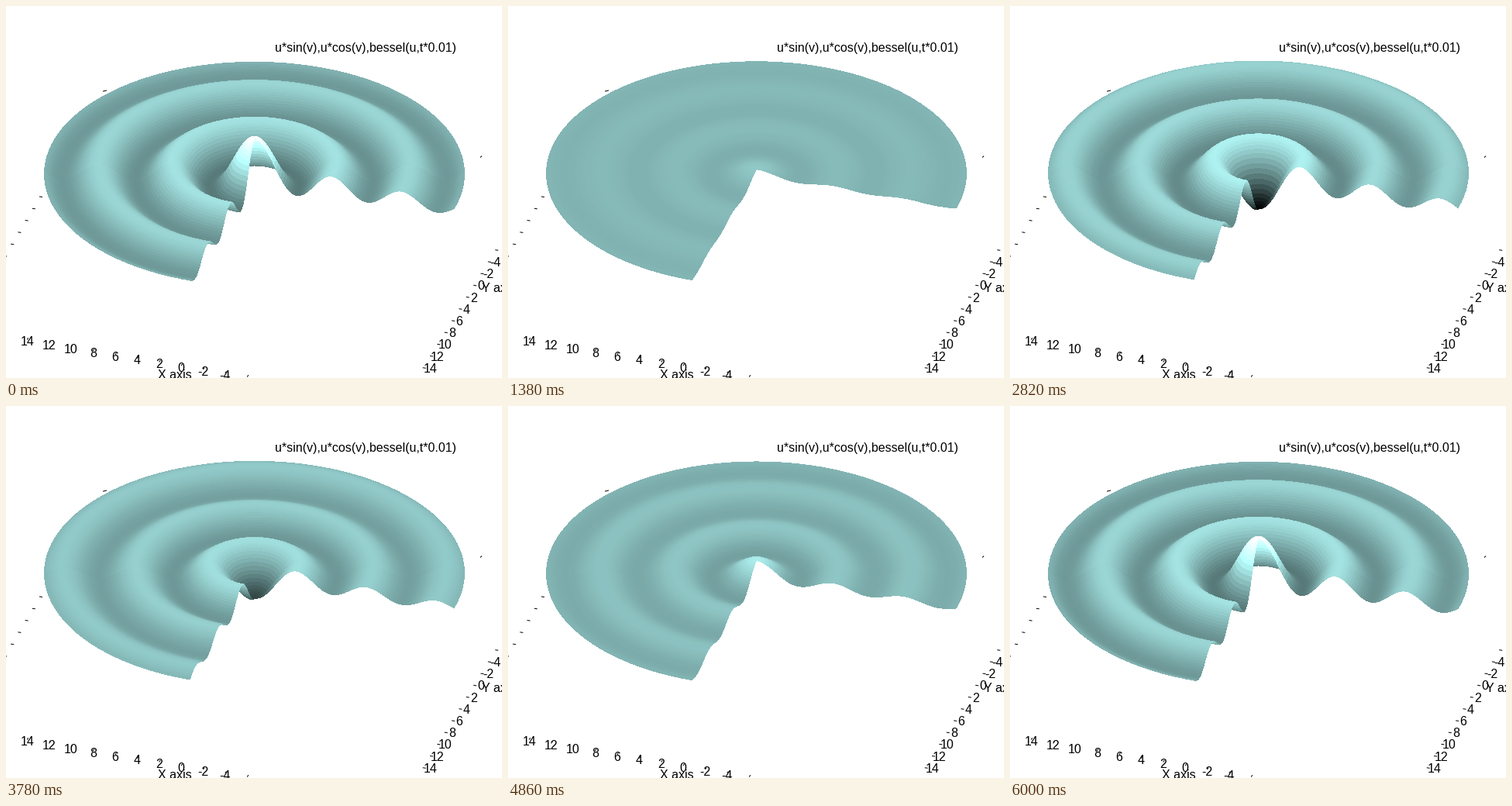
A matplotlib script that plays this animation: 640 by 480 pixels, repeating every 6060 ms.

```python
import numpy as np
import matplotlib.pyplot as plt
from matplotlib.animation import FuncAnimation
from matplotlib.collections import QuadMesh
from matplotlib.colors import ListedColormap, Normalize

W, H, DPI = 640, 480, 100
FRAMES, INTERVAL, PERIOD = 101, 60, 100

CX, CY = 320.5, 216.0      # screen position of the surface centre
SCALE = 15.03              # pixels per unit on the ground plane
TILT = 0.532               # vertical squash of the ground plane
LIFT = 46.2                # pixels per unit of height
RADIUS, RINGS, STEP = 18, 90, 3
BASE = np.array([131, 182, 181]) / 255

plt.rcParams["font.family"] = "Liberation Sans"
fig = plt.figure(figsize=(W / DPI, H / DPI), dpi=DPI, facecolor="white")
ax = fig.add_axes([0, 0, 1, 1])
ax.set_xlim(0, W)
ax.set_ylim(H, 0)
ax.axis("off")


def bessel0(u):
    theta = (np.arange(200) + 0.5) * np.pi / 200
    return np.cos(np.outer(u, np.sin(theta))).mean(axis=1)


def height_colors(n=512):
    z = np.linspace(-1, 1, n)
    gain = 1 + 0.8 * z + 0.2 * z ** 3
    return ListedColormap(np.clip(gain[:, None] * BASE, 0, 1))


CMAP = height_colors()
NORM = Normalize(-1, 1)


def make_patch(start, stop, inward):
    """Ground grid of one sector, ordered from the back to the front."""
    u = np.linspace(0, RADIUS, RINGS + 1)
    if inward:
        u = u[::-1]
    count = round(abs(stop - start) / STEP)
    phi = np.radians(np.linspace(start, stop, count + 1))
    x = CX + SCALE * np.outer(u, np.cos(phi))
    y = CY + SCALE * TILT * np.outer(u, np.sin(phi))
    return x, y, bessel0(u)


PATCHES = [
    make_patch(270, 180, True),    # back left
    make_patch(270, 360, True),    # back right
    make_patch(180, 108, False),   # front left
    make_patch(360, 378, False),   # front right
]


def label(x, y, text, ha="center"):
    # y is the middle of the digits
    ax.text(x, y + 5.8, text, fontsize=16 * 72 / DPI, ha=ha,
            va="baseline", color="black")


def tick(x, y, dx, dy):
    ax.plot([x - dx, x + dx], [y - dy, y + dy], color="black",
            lw=0.72, solid_capstyle="butt")


def draw_axes():
    label(347, 53.4, "u*sin(v),u*cos(v),bessel(u,t*0.01)", "left")

    for k in range(11):
        x, y = 27.3 + 28.4 * k, 432.6 + 4.8 * k
        tick(x + 0.7, y - 3.2, 0.8, -1.2)
        if k < 10:
            label(x, y, str(14 - 2 * k))
    label(196, 475.4, "X axis", "left")

    for k in range(11):
        x, y = 547.5 + 9.35 * k, 467 - 15.2 * k
        tick(x - 7.8, y, 2, 0.3)
        if k < 10:
            label(x, y, str(14 - 2 * k))
    label(614, 363.4, "Y axis", "left")

    for k in range(6):
        tick(45 - 9.2 * k, 246.2 + 15.3 * k, 2, 0.3)
    tick(127.5, 109.5, 2.5, -0.6)
    tick(613, 194.5, 1, -1)


draw_axes()
meshes = []


def draw(i):
    while meshes:
        meshes.pop().remove()
    swing = np.cos(2 * np.pi * i / PERIOD)
    for x, y, wave in PATCHES:
        z = swing * wave
        coords = np.stack([x, y - LIFT * z[:, None]], axis=-1)
        mid = (z[:-1] + z[1:]) / 2
        shade = np.repeat(mid[:, None], x.shape[1] - 1, axis=1)
        mesh = QuadMesh(coords, antialiased=False, array=shade, cmap=CMAP,
                        norm=NORM, edgecolors="face", linewidth=0.5)
        ax.add_collection(mesh, autolim=False)
        meshes.append(mesh)
    return meshes


anim = FuncAnimation(fig, draw, frames=FRAMES, interval=INTERVAL,
                     repeat=True, repeat_delay=0, blit=False)
plt.show()
```
